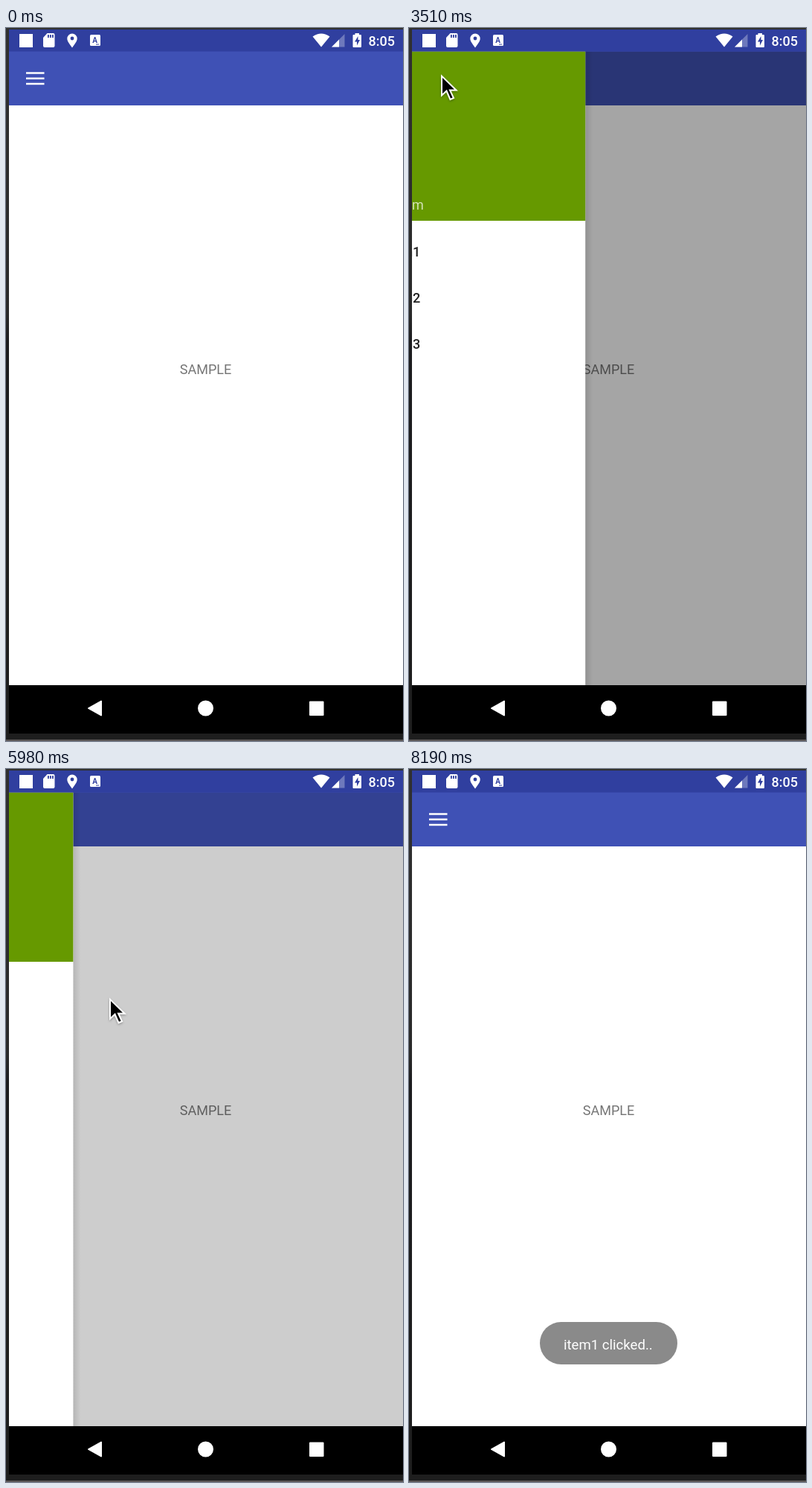
These frames come from a looping animation (534 px wide and 958 px high, 8.32 s). An HTML page:

```html
<!DOCTYPE html>
<html lang="en">
<head>
<meta charset="utf-8">
<title>Navigation drawer</title>
<style>
html, body { margin: 0; width: 100%; height: 100%; overflow: hidden; background: #1e1e1e; }
svg { display: block; width: 100vw; height: 100vh; }
text { font: 400 18px Roboto, sans-serif; }
.medium { font-weight: 500; }
</style>
</head>
<body>
<svg viewBox="0 0 534 958">
  <defs>
    <linearGradient id="edge" x2="0" y2="1">
      <stop offset="0" stop-color="#303030"/>
      <stop offset=".4" stop-color="#292929"/>
      <stop offset=".44" stop-color="#1c1c1e"/>
      <stop offset="1" stop-color="#1e1e1e"/>
    </linearGradient>
    <linearGradient id="shade">
      <stop offset="0" stop-opacity=".12"/>
      <stop offset="1" stop-opacity="0"/>
    </linearGradient>
    <clipPath id="content"><rect x="4" y="31.5" width="530" height="851.5"/></clipPath>
    <filter id="soft" x="-50%" y="-50%" width="200%" height="200%">
      <feDropShadow dx="0" dy="1.5" stdDeviation="1.5" flood-opacity=".3"/>
    </filter>
  </defs>

  <rect width="534" height="958" fill="url(#edge)"/>
  <rect y="956" width="534" height="2" fill="#5a5656"/>
  <rect x="4" y="104" width="530" height="779" fill="#fff"/>
  <rect x="4" y="31" width="530" height="73" fill="#3f51b5"/>
  <path d="M27 60.5h24.5M27 67.8h24.5M27 75h24.5" stroke="#fff" stroke-width="2.5"/>
  <text x="268.5" y="465" text-anchor="middle" fill="#757575">SAMPLE</text>

  <g clip-path="url(#content)">
    <rect id="scrim" x="4" y="31" width="530" height="852"/>
    <g id="drawer">
      <rect x="364" y="31" width="10" height="852" fill="url(#shade)"/>
      <rect x="4" y="31" width="360" height="852" fill="#fff"/>
      <rect x="4" y="31" width="360" height="228" fill="#690"/>
      <circle cx="44.5" cy="157" r="28.5" fill="#26a69a"/>
      <text x="14" y="218" class="medium" fill="#fff">vuki</text>
      <text x="14" y="244" fill="#fff" fill-opacity=".72">vuki@nusar.com</text>
      <g id="items"></g>
    </g>
  </g>

  <g id="toast">
    <rect x="176" y="743" width="185" height="57" rx="28.5" fill="#666"/>
    <text x="208" y="780" style="font-size:18.6px" fill="#fff">item1 clicked..</text>
  </g>

  <rect x="4" y="2" width="530" height="29.5" fill="#303f9f"/>
  <g fill="#fff">
    <rect x="18" y="8" width="18" height="18"/>
    <path d="M55.5 7H63.5Q65.5 7 65.5 9V24Q65.5 26 63.5 26H52Q50 26 50 24V13Z"/>
    <path d="M89 26.5C85 21 82.3 17.5 82.3 14.2a6.7 6.7 0 0 1 13.4 0C95.7 17.5 93 21 89 26.5Z"/>
    <rect x="113" y="9" width="14" height="15" rx="1.5"/>
    <path d="M424 25.5 412.5 11.5Q424 3.5 435.5 11.5Z"/>
    <path d="M455.5 8V25.5H438Z" fill-opacity=".3"/>
    <path d="M448 15.5V25.5H438Z"/>
    <path d="M469.5 9V7H475V9H477Q478 9 478 10V25Q478 26 477 26H467.5Q466.5 26 466.5 25V10Q466.5 9 467.5 9Z"/>
    <text x="487.5" y="24" class="medium">8:05</text>
  </g>
  <g fill="#303f9f">
    <path d="M56 9h1.8v4H56zM59 9h1.8v4H59zM62 9h1.8v4H62z"/>
    <circle cx="89" cy="14" r="2.4"/>
    <path d="M473.5 11 469 18.5H472V23.5L476 16H473.5Z"/>
    <text x="119.5" y="20" text-anchor="middle" style="font-size:10px;font-weight:700">A</text>
    <path d="M121 21.5h4v1h-4z"/>
  </g>

  <rect x="4" y="883" width="530" height="65"/>
  <g fill="#fff" stroke="#fff" stroke-width="2" stroke-linejoin="round">
    <path d="M111 914 128 904.5V923.5Z"/>
    <circle cx="268.5" cy="914" r="9.5"/>
    <rect x="409" y="905.5" width="17.5" height="17.5"/>
  </g>

  <path id="cursor" d="M1 2.5V28.500L7.500 22.500 12.500 34 17 32 12 21.500H20.500Z"
    stroke="#fff" stroke-width="2" filter="url(#soft)"/>
</svg>
<script>
const LOOP = 8320, STEP = 130;
const OPEN_AT = 3397, CLOSE_AT = 5903, SCRIM_LAG = 15;
const SHOW_AT = 1040, HIDE_AT = 7280;

const el = id => document.getElementById(id);
const clamp = v => Math.min(1, Math.max(0, v));
const progress = (t, start, duration) => clamp((t - start) / duration);
const settle = u => 1 - (1 - u) ** 5;
const glide = u => u * u * (3 - 2 * u);

el('items').innerHTML = [1, 2, 3].map(n => {
  const y = 238 + n * 62;
  return `<circle cx="39.5" cy="${y}" r="14.3" fill="#757575"/>
    <text x="96" y="${y + 7}" class="medium" fill="#212121">item${n}</text>`;
}).join('');

const entry = { x: 330, y: 778 };
const moves = [
  { x: 111, y: 270, start: 1040, duration: 390 },
  { x: 43, y: 62, start: 1560, duration: 520 },
  { x: 58, y: 261, start: 3640, duration: 650 },
  { x: 139, y: 307, start: 4290, duration: 520 },
  { x: 440, y: 870, start: 6500, duration: 700 }
];

const openness = t =>
  settle(progress(t, OPEN_AT, 600)) - settle(progress(t, CLOSE_AT, 310));

const toastOpacity = t =>
  Math.min(progress(t, 5980, 260), 1 - progress(t, 7930, 1080));

const cursorAt = t => moves.reduce((p, m) => {
  const k = glide(progress(t, m.start, m.duration));
  return { x: p.x + (m.x - p.x) * k, y: p.y + (m.y - p.y) * k };
}, entry);

function render(t) {
  const open = openness(t), { x, y } = cursorAt(t);
  el('drawer').setAttribute('transform', `translate(${(open - 1) * 360})`);
  el('drawer').style.display = open > 0 ? '' : 'none';
  el('scrim').setAttribute('opacity', 0.6 * openness(t - SCRIM_LAG));
  el('toast').setAttribute('opacity', toastOpacity(t));
  el('cursor').setAttribute('transform', `translate(${x} ${y})`);
  el('cursor').style.display = t >= SHOW_AT && t < HIDE_AT ? '' : 'none';
}

const start = performance.now();
function tick() {
  const t = (performance.now() - start) % LOOP;
  render(Math.floor(t / STEP) * STEP);
  requestAnimationFrame(tick);
}
tick();
</script>
</body>
</html>
```
